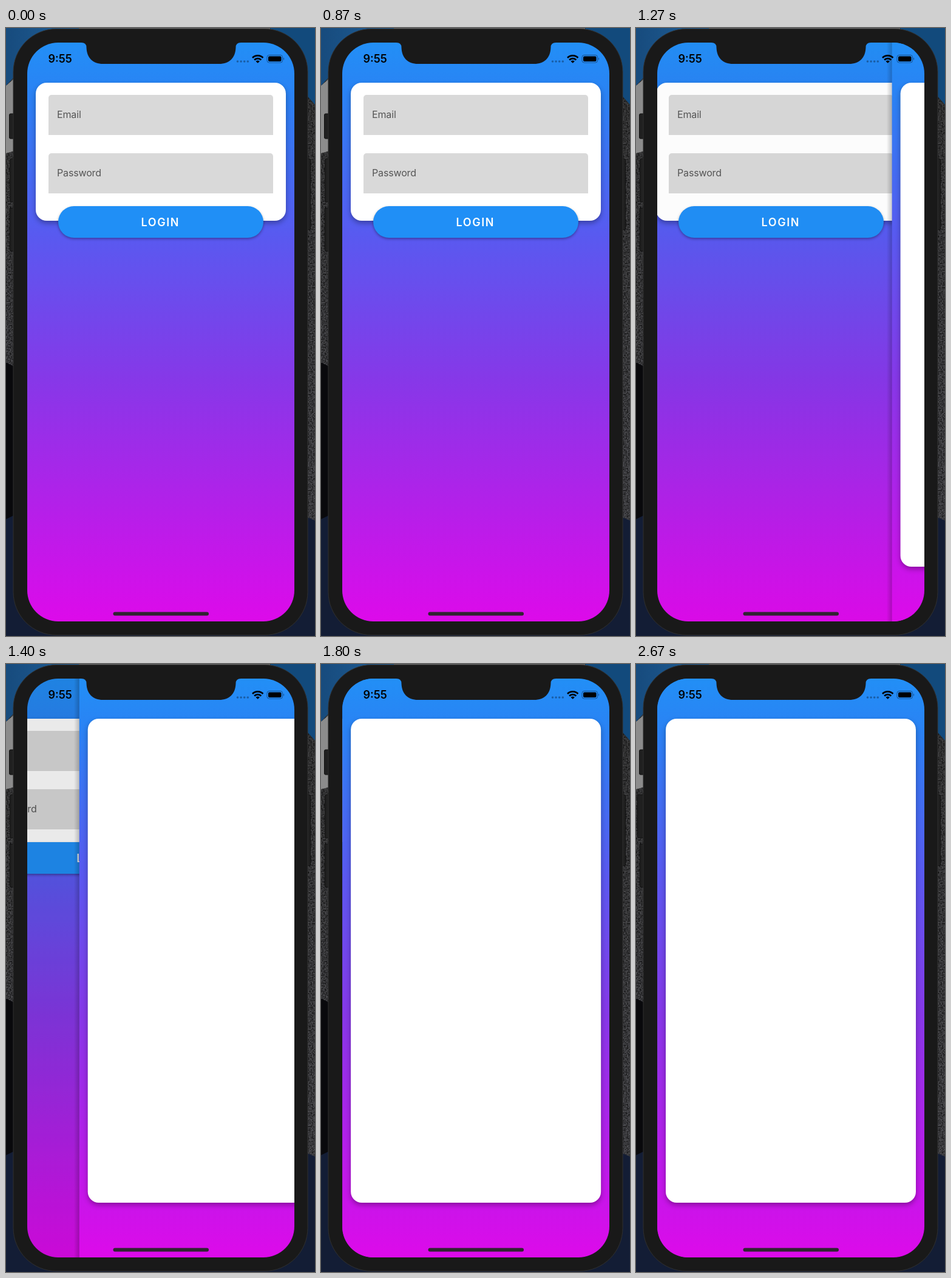
An HTML page that plays this animation: 509 px wide and 1000 px high, repeating every 2.74 s.

```html
<!DOCTYPE html>
<html lang="en">
<head>
<meta charset="utf-8">
<title>Login transition</title>
<style>
  html, body { margin: 0; width: 100%; height: 100%; overflow: hidden; background: #333; }
  body { position: relative; font-family: Inter, sans-serif; }
  svg { position: absolute; left: 0; top: 0; }
  div { position: absolute; box-sizing: border-box; }
  #screen { left: 35px; top: 24px; width: 440px; height: 952px; border-radius: 51px; overflow: hidden; }
  .page { inset: 0; background: linear-gradient(#228ff6, #2a82f4 9%, #585af0 33%, #8638e8 58%, #dd0aea); }
  .card { left: 14px; top: 65.5px; width: 412px; height: 227.500px; border-radius: 18px; background: #fff;
          box-shadow: 0 4px 9px rgba(0, 0, 0, .32); }
  #next .card { height: 796px; }
  .field { left: 35px; width: 370px; height: 66px; padding-left: 14px; border-radius: 5px 5px 0 0;
           background: #d9d9d9; color: #555; font-size: 16px; line-height: 65px; letter-spacing: -.15px; }
  #button { left: 51px; top: 269px; width: 338px; height: 52px; padding-left: 136.500px; border-radius: 26px;
            background: #208ff6; color: #fff; font-size: 18px; font-weight: 600; line-height: 53.500px;
            letter-spacing: 1.6px; box-shadow: 0 2px 4px rgba(0, 0, 0, .35); }
  #press { inset: 0; border-radius: 26px; background: rgba(0, 0, 0, .15); }
  #dim { inset: 0; background: #000; }
  #edge { left: -9px; top: 0; width: 9px; height: 100%;
          background: linear-gradient(90deg, transparent, rgba(0, 0, 0, .2)); }
</style>
</head>
<body>
<svg width="509" height="1000">
  <defs>
    <filter id="grain" x="0" y="0" width="1" height="1" color-interpolation-filters="sRGB">
      <feTurbulence type="fractalNoise" baseFrequency=".45" numOctaves="2" seed="4"/>
      <feColorMatrix values="0 0 0 0 0  0 0 0 0 0  0 0 0 0 0  1.6 0 0 0 -.5"/>
    </filter>
    <linearGradient id="blue"><stop stop-color="#174b7d"/><stop offset="1" stop-color="#1f5f98"/></linearGradient>
    <linearGradient id="road" x2="0" y2="1"><stop stop-color="#404040"/><stop offset="1" stop-color="#55555b"/></linearGradient>
  </defs>
  <rect width="509" height="1000" fill="url(#road)"/>
  <rect width="509" height="1000" filter="url(#grain)"/>
  <path d="M0 0H120V20L12 82L0 95Z" fill="url(#blue)"/>
  <path d="M120 0H435V20H120Z" fill="#686868"/>
  <path d="M435 0H509V126L490 105Z" fill="#124a7c"/>
  <path d="M0 95L40 60V195L0 206Z" fill="#8c8c8c"/>
  <path d="M0 550L20 560V800L0 808Z" fill="#09090c"/>
  <path d="M0 808L20 798V1000H0ZM485 800L509 810V1000H485Z" fill="#131d35"/>
  <path d="M10 935H500V1000H10Z" fill="#131d35"/>
  <g fill="#202020" stroke="#111">
    <rect x="5.5" y="141" width="12" height="41" rx="2"/>
    <rect id="volume" x="6.5" y="215" width="16" height="71" rx="2"/>
    <rect x="6.5" y="296" width="12" height="71" rx="2"/>
    <rect x="490" y="215" width="11.5" height="117" rx="2"/>
  </g>
  <rect x="12" y="1.5" width="485" height="997" rx="71" fill="#191919" stroke="#303030"/>
</svg>

<div id="screen">
  <div class="page" id="login">
    <div class="card"></div>
    <div class="field" style="top:86px">Email</div>
    <div class="field" style="top:182px">Password</div>
    <div id="button">LOGIN<div id="press"></div></div>
    <div id="dim"></div>
  </div>
  <div class="page" id="next"><div id="edge"></div><div class="card"></div></div>
</div>

<svg width="509" height="1000">
  <path d="M124 23V24Q132.500 24 132.500 32C133 49 143 59 160 59H351C368 59 378 49 378.500 32Q378.500 24 387 24V23Z" fill="#191919"/>
  <text x="69.500" y="57" font-size="18" font-weight="600">9:55</text>
  <path d="M381.500 55h17" stroke="#000" stroke-opacity=".32" stroke-width="3.600" stroke-linecap="round" stroke-dasharray="0 5.600"/>
  <path d="M406 49a12.300 12.300 0 0 1 17.400 0M409.100 52.500a8 8 0 0 1 11.200 0" fill="none" stroke="#000" stroke-width="2.700"/>
  <path d="M411.500 54.800a4.600 4.600 0 0 1 6.400 0L414.700 57.800Z"/>
  <rect x="430" y="44.500" width="25.500" height="12.500" rx="3.500" fill="none" stroke="#000" stroke-opacity=".4"/>
  <rect x="432" y="46.500" width="21.500" height="8.500" rx="2"/>
  <path d="M457 48.500q2 2.200 0 4.400Z" opacity=".45"/>
  <rect x="176.500" y="960.500" width="157.500" height="6" rx="3" fill="#302430"/>
</svg>

<script>
  const LOOP = 2740, PRESS = 1030, PUSH = 1239, OMEGA = 18.7, WIDTH = 440;
  const el = id => document.getElementById(id);
  const clamp = v => Math.min(1, Math.max(0, v));

  // Critically damped spring from 0 to 1
  const spring = ms => {
    const u = OMEGA * Math.max(0, ms) / 1000;
    return 1 - (1 + u) * Math.exp(-u);
  };

  function draw(now) {
    const t = now % LOOP;
    const p = t > PUSH + 600 ? 1 : spring(t - PUSH);
    el('login').style.transform = `translateX(${-0.3 * WIDTH * p}px)`;
    el('next').style.transform = `translateX(${WIDTH * (1 - p)}px)`;
    el('next').style.visibility = t < PUSH ? 'hidden' : 'visible';
    el('dim').style.opacity = 0.1 * p;
    el('press').style.opacity = t >= PRESS && t < PUSH ? 1 : 0;
    el('volume').setAttribute('x', 6.5 - 4 * clamp((t - 2470) / 130));
  }

  const start = performance.now();
  function tick() {
    draw(performance.now() - start);
    requestAnimationFrame(tick);
  }
  tick();
</script>
</body>
</html>
```
